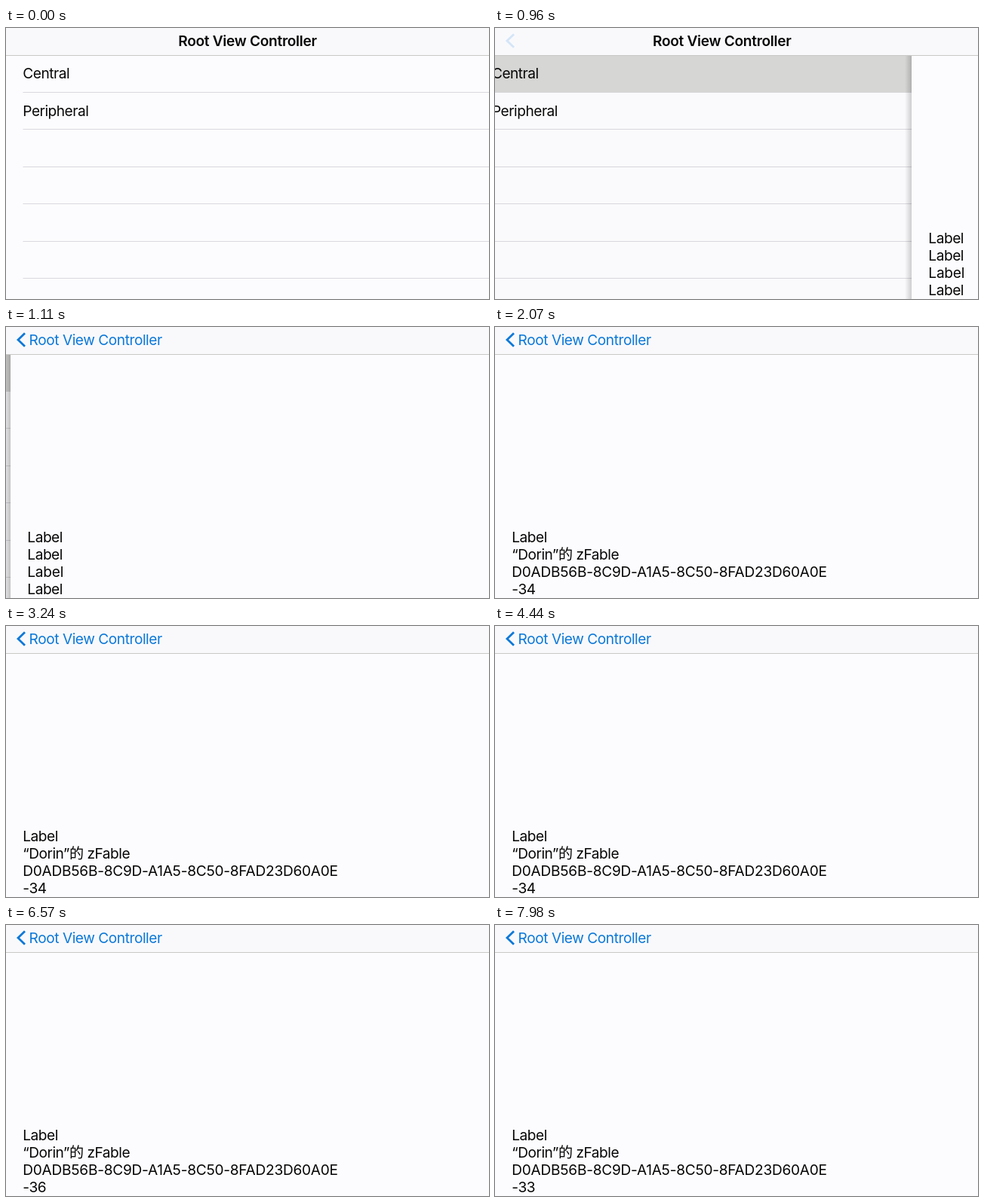
Recreate the animation shown at these times as an HTML page. Size 640 by 360 pixels, loop 8000 ms.

```html
<!DOCTYPE html>
<html lang="zh-CN">
<head>
<meta charset="utf-8">
<title>Root View Controller</title>
<style>
  html, body { margin: 0; width: 100%; height: 100%; overflow: hidden; background: #fcfcfe; }
  svg { display: block; width: 640px; height: 360px; }
  text {
    font: 19.1px Inter, Roboto, "Noto Sans CJK SC", "Noto Sans CJK", sans-serif;
    letter-spacing: -.48px;
    fill: #060606;
  }
  #title { font-weight: 600; letter-spacing: -.3px; text-anchor: middle; }
  #uuid { letter-spacing: -.26px; }
  #backLabel { fill: #0a78d8; letter-spacing: -.44px; }
  #chevron { fill: none; stroke: #0a78d8; stroke-width: 2.8; }
</style>
</head>
<body>
<svg viewBox="0 0 640 360">
  <defs>
    <linearGradient id="shade">
      <stop offset="0" stop-opacity="0"/>
      <stop offset="1" stop-opacity=".18"/>
    </linearGradient>
  </defs>

  <rect width="640" height="360" fill="#fcfcfe"/>
  <g id="list">
    <g id="lines"></g>
    <rect id="highlight" y="37" width="840" height="48.5" fill="#d8d8d7"/>
    <text x="22.3" y="67">Central</text>
    <text x="22.3" y="116.5">Peripheral</text>
  </g>
  <rect id="dim" y="37" width="640" height="323"/>

  <g id="detail">
    <rect x="-9" y="37" width="9" height="323" fill="url(#shade)"/>
    <rect y="37" width="640" height="323" fill="#fcfcfe"/>
    <text x="22.3" y="286">Label</text>
    <text x="22.3" y="309" class="field"></text>
    <text x="22.3" y="332" class="field" id="uuid"></text>
    <text x="22.3" y="355" class="field"></text>
  </g>

  <rect width="640" height="36" fill="#f9f9fc"/>
  <rect y="36" width="640" height="1" fill="#c8c8c5"/>
  <text id="title" x="320" y="23.5">Root View Controller</text>
  <text id="backLabel" x="30.6" y="23.5">Root View Controller</text>
  <path id="chevron" d="M25 8.3 L16 17 L25 25.7"/>
</svg>
<script>
const LOOP = 8000, STEP = 30, TOUCH = 780, PUSH = 944, FOUND = 1650;
const $ = id => document.getElementById(id);
const fields = document.querySelectorAll('.field');
const clamp = v => Math.max(0, Math.min(1, v));
const moveX = (id, x) => $(id).setAttribute('transform', `translate(${x.toFixed(2)} 0)`);
const fade = (id, opacity) => $(id).setAttribute('opacity', clamp(opacity));

$('lines').innerHTML = Array.from({ length: 6 }, (_, i) =>
  `<rect x="22.5" y="${Math.floor(85 + i * 49.5)}" width="820" height="1" fill="#d9d9df"/>`).join('');

// Critically damped spring, 0 to 1.
function spring(ms) {
  const a = Math.max(0, ms) * 0.0404;
  const p = 1 - (1 + a) * Math.exp(-a);
  return p > 0.9995 ? 1 : p;
}

function readings(t) {
  if (t < FOUND) return ['Label', 'Label', 'Label'];
  const signal = t < 5500 ? '-34' : t < 7300 ? '-36' : '-33';
  return ['“Dorin”的 zFable', 'D0ADB56B-8C9D-A1A5-8C50-8FAD23D60A0E', signal];
}

function render(t) {
  const push = spring(t - PUSH);
  moveX('list', -192 * push);
  moveX('detail', 640 * (1 - push));
  fade('highlight', t >= TOUCH ? 1 : 0);
  fade('dim', 0.06 * push);

  const bar = clamp(Math.pow(push, 1.18) * 1.012);
  moveX('title', -198 * bar);
  moveX('backLabel', 198 * (1 - bar));
  fade('title', 1 - (bar - 0.1) / 0.6);
  fade('backLabel', (bar - 0.2) / 0.6);
  fade('chevron', bar * 1.6);

  // The shadow sits left of the page, so hide the page until it moves.
  $('detail').style.visibility = push > 0 ? 'visible' : 'hidden';
  readings(t).forEach((value, i) => {
    if (fields[i].textContent !== value) fields[i].textContent = value;
  });
}

const start = performance.now();
function frame() {
  const t = (performance.now() - start) % LOOP;
  render(Math.floor((t + 2) / STEP) * STEP);
  requestAnimationFrame(frame);
}
frame();
</script>
</body>
</html>
```
